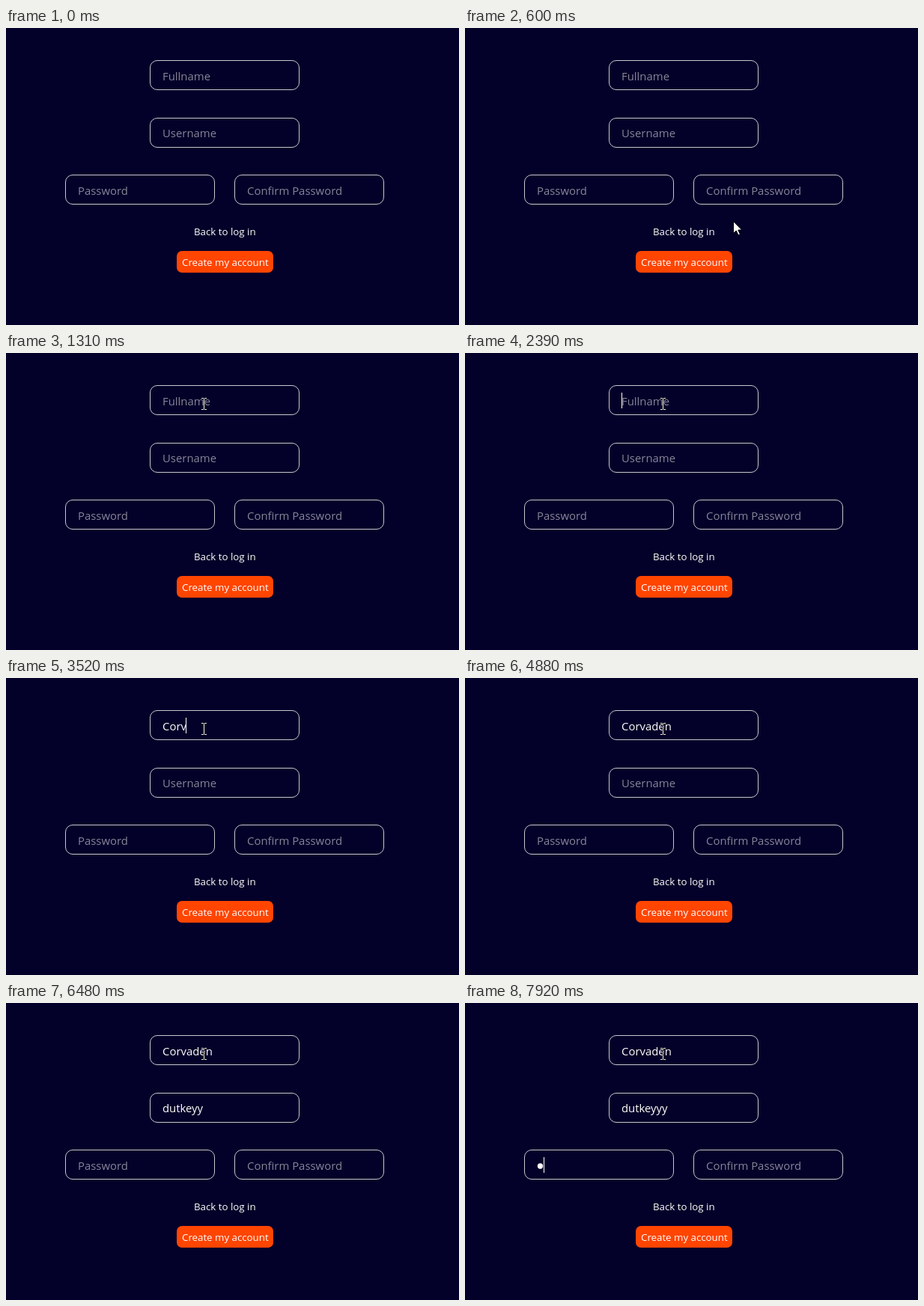
These frames come from a looping animation (605x397 px, 8000 ms). An HTML page:

```html
<!DOCTYPE html>
<html lang="en">
<head>
<meta charset="utf-8">
<title>Sign-up form</title>
<style>
  html, body { margin: 0; width: 100%; height: 100%; overflow: hidden; background: #030029; }
  svg { display: block; width: 605px; height: 397px; background: #030029; }
  text { font-family: "Open Sans", "Noto Sans", sans-serif; fill: #fff; white-space: pre; }
  .field { font-size: 14.9px; }
  .field.hint { fill: #888599; }
  .label { font-size: 13.3px; }
  .box { fill: none; stroke: #c9c8d0; }
  .caret { fill: #fff; }
  #beam { mix-blend-mode: difference; }
</style>
</head>
<body>
<svg id="stage" viewBox="0 0 605 397" xmlns="http://www.w3.org/2000/svg">
  <g id="form"></g>
  <text class="label" x="251" y="277">Back to log in</text>
  <rect x="228" y="298" width="129" height="29" rx="7" fill="#ff4500"/>
  <text class="label" x="235" y="318">Create my account</text>
  <path id="arrow" d="M.5 .5V16.5L4.2 13L7 18.8L9.4 17.7L6.8 12H11.7Z" fill="#fff" stroke="#000"/>
  <path id="beam" d="M-3 -8h3v1h1v-1h3v1h-3v14h3v1h-3v-1h-1v1h-3v-1h3v-14h-3z" fill="#fff" shape-rendering="crispEdges"/>
</svg>
<script>
const LOOP = 8000;
const BOX_W = 200, BOX_H = 40;
const form = document.getElementById('form');
const arrow = document.getElementById('arrow');
const beam = document.getElementById('beam');

// keys: time of each keystroke; blink: times at which the caret toggles
const fields = [
  { x: 192, y: 43, base: 70, hint: 'Fullname', value: 'Corvaden',
    keys: [2510, 3000, 3240, 3440, 3554, 3668, 3782, 3896],
    blink: [1340, 1850, 2390, 2930, 3000, 4010] },
  { x: 192, y: 120, base: 146, hint: 'Username', value: 'dutkeyyy',
    keys: [5080, 5180, 5400, 5460, 5660, 6150, 6330, 6820],
    blink: [4360, 4880, 5080, 5950, 6150, 6480, 6820, 7020] },
  { x: 79, y: 196, base: 223, hint: 'Password', secret: true,
    keys: [7920], blink: [7150, 7660, 7920] },
  { x: 305, y: 196, base: 223, hint: 'Confirm Password', keys: [], blink: [] }
];

// pointer path: time, x, y
const path = [
  [390, 416, 388], [600, 358, 258], [950, 273, 102],
  [1170, 265, 73], [1400, 264, 68]
];

function add(tag, attrs) {
  const el = document.createElementNS('http://www.w3.org/2000/svg', tag);
  for (const k in attrs) el.setAttribute(k, attrs[k]);
  return form.appendChild(el);
}

function show(el, on) {
  el.setAttribute('visibility', on ? 'visible' : 'hidden');
}

const passed = (times, t) => times.filter(s => s <= t).length;

for (const f of fields) {
  f.left = f.x + 17;
  add('rect', { class: 'box', x: f.x + .5, y: f.y + .5, width: BOX_W - 1, height: BOX_H - 1, rx: 9.5 });
  f.text = add('text', { class: 'field', x: f.left, y: f.base });
  f.dot = add('circle', { cx: f.left + 4.5, cy: f.base - 5, r: 3.7, fill: '#fff' });
  f.caret = add('rect', { class: 'caret', y: f.base - 17, width: 1, height: 21 });
}

function drawField(f, t) {
  const n = passed(f.keys, t);
  f.text.textContent = n ? (f.secret ? '' : f.value.slice(0, n)) : f.hint;
  f.text.setAttribute('class', n ? 'field' : 'field hint');
  show(f.dot, f.secret && n > 0);
  const width = !n ? 0 : f.secret ? 9 : f.text.getComputedTextLength();
  f.caret.setAttribute('x', Math.floor(f.left + width));
  show(f.caret, passed(f.blink, t) % 2 === 1);
}

function slope(i, k) {
  const a = path[Math.max(i - 1, 0)], b = path[Math.min(i + 1, path.length - 1)];
  return (b[k] - a[k]) / (b[0] - a[0]);
}

// smooth curve through the path points
function pointer(t) {
  const last = path.length - 1;
  if (t >= path[last][0]) return path[last].slice(1);
  const i = path.findIndex(p => p[0] > t) - 1;
  const a = path[i], b = path[i + 1], d = b[0] - a[0];
  const u = (t - a[0]) / d, v = 1 - u;
  return [1, 2].map(k => Math.round(
    v * v * (1 + 2 * u) * a[k] + u * u * (3 - 2 * u) * b[k] +
    d * u * v * (v * slope(i, k) - u * (i + 1 === last ? 0 : slope(i + 1, k)))
  ));
}

function drawPointer(t) {
  const seen = t >= path[0][0];
  const [x, y] = seen ? pointer(t) : [0, 0];
  const over = fields.some(f => x >= f.x && x < f.x + BOX_W && y >= f.y && y < f.y + BOX_H);
  for (const el of [arrow, beam]) el.setAttribute('transform', `translate(${x} ${y})`);
  show(arrow, seen && !over);
  show(beam, seen && over);
}

function draw(t) {
  for (const f of fields) drawField(f, t);
  drawPointer(t);
}

let start;
function tick(now) {
  if (start === undefined) start = now;
  draw((now - start) % LOOP);
  requestAnimationFrame(tick);
}
draw(0);
requestAnimationFrame(tick);
</script>
</body>
</html>
```
